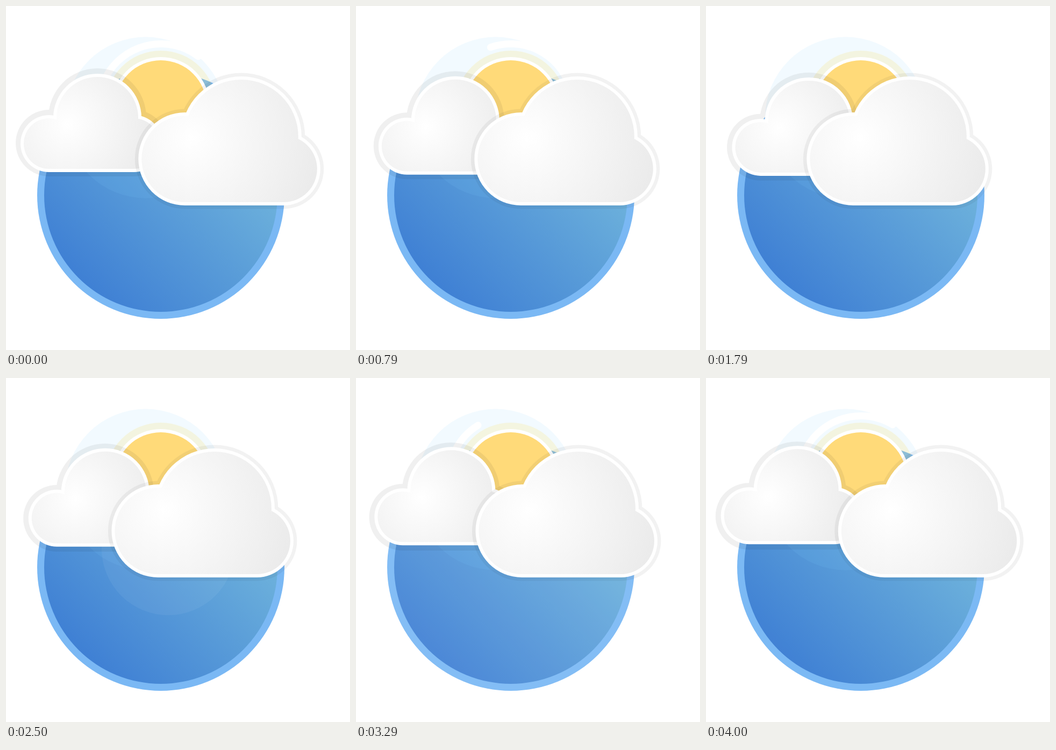
Animation of 640 by 640 pixels, one loop 4.07 s. Source, as an HTML page with a canvas:

```html
<!DOCTYPE html>
<html lang="en">
<head>
<meta charset="utf-8">
<title>Partly cloudy</title>
<style>
  html, body { margin: 0; width: 100%; height: 100%; overflow: hidden; background: #fff; }
  canvas { display: block; width: 640px; height: 640px; }
</style>
</head>
<body>
<canvas id="stage" width="640" height="640"></canvas>
<script>
const ctx = document.getElementById('stage').getContext('2d');
const LOOP = 4070;
const TAU = Math.PI * 2;

// Lobes are [x, y, radius] of the outer white rim; the first and last stand on the base.
const backCloud = {
  lobes: [[80, 256, 53], [170, 208, 82], [238, 256, 53]],
  base: 309, glow: [115, 220, 165], shadow: 9, shade: 0.06
};
const frontCloud = {
  lobes: [[333, 284.5, 86.5], [438, 243, 112], [517, 303, 68]],
  base: 371, glow: [345, 245, 240], shadow: 6.5, shade: 0.05
};

function fade(gradient, from, to) {
  gradient.addColorStop(0, from);
  gradient.addColorStop(1, to);
  return gradient;
}

const sky = fade(ctx.createLinearGradient(135, 505, 441, 199), '#3f80d4', '#75badd');
for (const cloud of [backCloud, frontCloud]) {
  const [x, y, r] = cloud.glow;
  cloud.fill = fade(ctx.createRadialGradient(x, y, 0, x, y, r), '#fff', '#ebebeb');
}

function disc(x, y, r, color) {
  ctx.fillStyle = color;
  ctx.beginPath();
  ctx.arc(x, y, r, 0, TAU);
  ctx.fill();
}

function cloudLayer({ lobes, base }, grow, color) {
  ctx.fillStyle = color;
  ctx.beginPath();
  for (const [x, y, r] of lobes) {
    ctx.moveTo(x + r + grow, y);
    ctx.arc(x, y, r + grow, 0, TAU);
  }
  const left = lobes[0][0], right = lobes[2][0], top = lobes[2][1];
  ctx.rect(left, top, right - left, base + grow - top);
  ctx.fill();
}

function drawCloud(cloud, dx, dy, shadowX, shadowY) {
  ctx.save();
  ctx.translate(dx + shadowX, dy + shadowY);
  cloudLayer(cloud, cloud.shadow, `rgba(0,0,0,${cloud.shade})`);
  ctx.translate(-shadowX, -shadowY);
  cloudLayer(cloud, 0, '#fff');
  cloudLayer(cloud, -6, cloud.fill);
  ctx.restore();
}

// Rises linearly 0 to 1 until the peak, then falls back to 0 at the end.
function triangle(p, peak) {
  return p < peak ? p / peak : (1 - p) / (1 - peak);
}

function drawRipple(t) {
  const r = 124 + (t - 2500) * 0.214;
  const alpha = 0.1 * Math.min((t - 2070) / 860, (LOOP - t) / 1140);
  if (alpha <= 0) return;
  disc(302 - (r - 124) * 0.109, 317 + (r - 124) * 0.293, r, `rgba(255,255,255,${alpha})`);
}

function drawOrbit(p) {
  const head = (37 - 90) / 360 * TAU + p * TAU;
  ctx.strokeStyle = '#fff';
  ctx.lineWidth = 13;
  ctx.lineCap = 'round';
  ctx.beginPath();
  ctx.arc(288, 186, 115.5, head - 0.35 * TAU, head);
  ctx.stroke();
}

function draw(now) {
  const t = now % LOOP;
  const p = t / LOOP;
  ctx.clearRect(0, 0, 640, 640);

  disc(288, 352, 230, '#7ab8f4');
  disc(288, 352, 217, sky);
  drawRipple(t);
  disc(260, 207.5, 150, 'rgba(125,205,255,0.1)');
  drawOrbit(p);

  disc(288, 186, 103, 'rgba(255,200,0,0.12)');
  disc(288, 186, 91, '#fff');
  disc(288, 186, 85, '#ffda79');

  const back = triangle(p, 1 / 3);
  drawCloud(backCloud, 25.5 * back, 8.2 * back, -p, 2 * p - 1);
  const front = triangle((p + 0.0065) % 1, 0.5);
  drawCloud(frontCloud, 0.7 - 67 * front, 0, 0, 0);
}

const start = performance.now();
function tick() {
  draw(performance.now() - start);
  requestAnimationFrame(tick);
}
tick();
</script>
</body>
</html>
```
